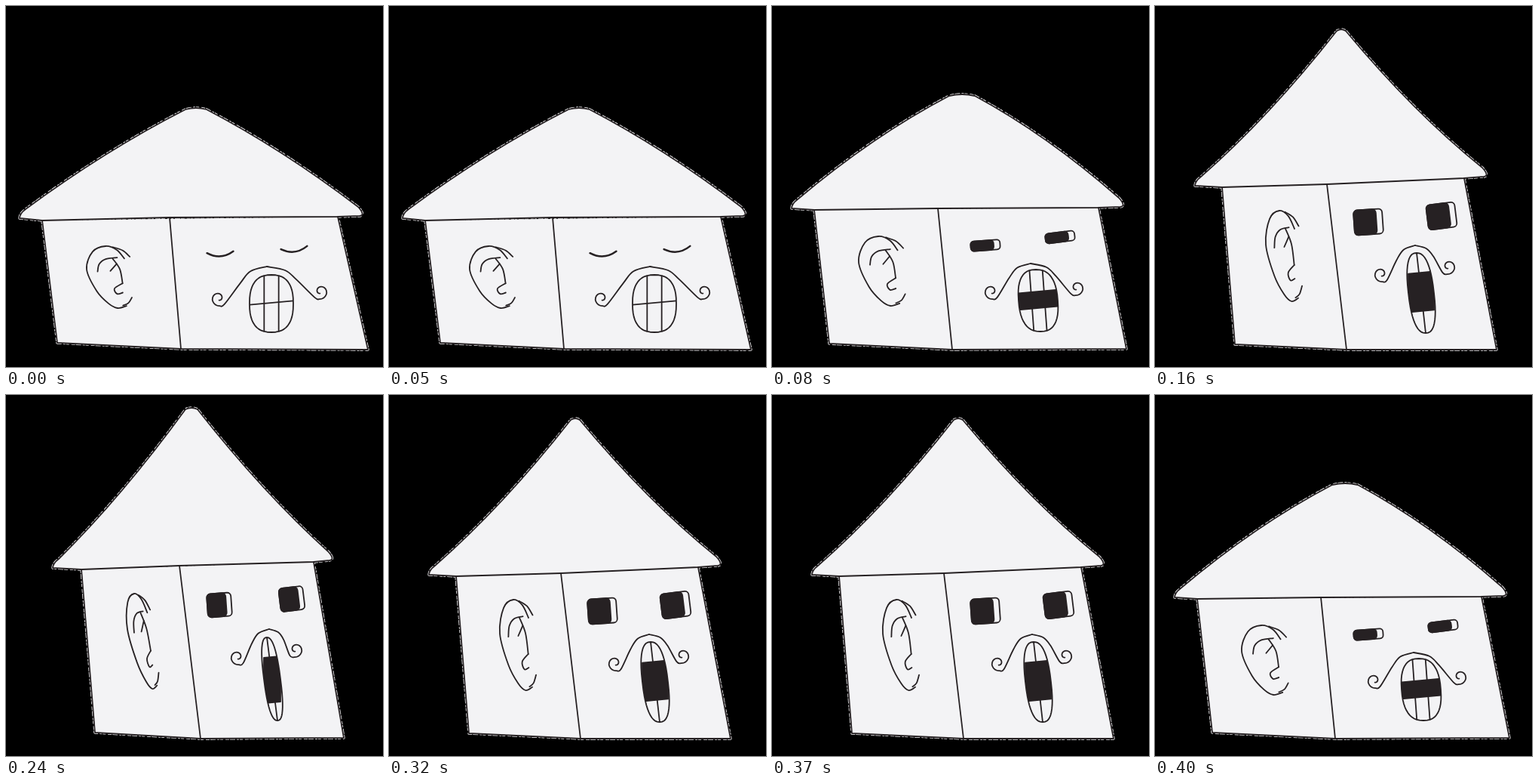
Animation, 500 px wide and 478 px high, one loop 0.48 s. Source, as an HTML page:

```html
<!DOCTYPE html>
<html lang="en">
<head>
<meta charset="utf-8">
<title>Singing house</title>
<style>
html, body { margin: 0; width: 100%; height: 100%; overflow: hidden; background: #000; }
svg { display: block; width: 500px; height: 478px; }
path, rect { fill: none; stroke: #262123; stroke-width: 1.8; stroke-linecap: round; stroke-linejoin: round; }
.paper { fill: #f3f3f5; stroke: none; }
.rim { stroke: #e8e8ea; stroke-width: 3.4; stroke-linecap: butt; stroke-dasharray: 5 1 7 2 3 1 4 3; }
.ink { fill: #262123; }
.bold { stroke-width: 2.5; }
</style>
</head>
<body>
<svg id="stage" viewBox="0 0 500 478"></svg>
<script>
// roof: left tip, apex, right tip; eave: wall tops; base: wall feet.
// ear and mouth: centre, half width, half height, lean.
const poses = [
  {
    roof: [[18, 281], [252, 133], [475, 277]], round: 14, bulge: 6,
    eave: [[48, 284], [217, 280], [440, 279]], base: [[68, 446], [232, 454], [480, 455]],
    ear: [140, 359, 31, 41, 8],
    eyes: [[284, 326], [382, 320]], eye: [35, 0],
    lip: [346, 345], curls: [[282, 387], [417, 378]],
    mouth: [352, 394, 29, 38, 0], gap: [393, 393], teeth: 3
  },
  {
    roof: [[26, 268], [252, 115], [468, 265]], round: 17, bulge: 8,
    eave: [[56, 270], [220, 268], [433, 267]], base: [[76, 447], [239, 455], [470, 454]],
    ear: [149, 351, 32, 46, 8],
    eyes: [[283, 317], [382, 306]], eye: [39, 13],
    lip: [343, 341], curls: [[291, 378], [404, 373]],
    mouth: [353, 390, 26, 41, 3], gap: [378, 400], teeth: 3
  },
  {
    roof: [[53, 238], [247, 29], [442, 225]], round: 6, bulge: -9,
    eave: [[89, 240], [228, 236], [410, 228]], base: [[106, 448], [254, 455], [453, 455]],
    ear: [173, 331, 24, 60, 8],
    eyes: [[283, 286], [380, 278]], eye: [38, 33],
    lip: [345, 317], curls: [[300, 355], [389, 345]],
    mouth: [353, 380, 17, 53, 6], gap: [353, 404], teeth: 2
  },
  {
    roof: [[62, 229], [246, 15], [435, 218]], round: 8, bulge: -8,
    eave: [[100, 231], [230, 226], [408, 221]], base: [[118, 447], [258, 455], [448, 454]],
    ear: [182, 326, 18, 63, 12],
    eyes: [[283, 278], [379, 270]], eye: [32, 31],
    lip: [349, 310], curls: [[307, 347], [384, 337]],
    mouth: [353, 376, 11, 55, 7], gap: [347, 407], teeth: 2
  }
];
const order = [0, 1, 2, 3, 2, 1];
const hold = 80;

// Ear strokes in a unit box: rim, two ticks, folds, lobe.
const earStrokes = [
  [[.7, -.6], [.45, -.88], [0, -1], [-.6, -.82], [-1, -.25], [-.75, .45], [-.35, .85], [0, 1], [.4, .93]],
  [[.3, -.97], [.7, -.86], [.95, -.66]],
  [[.25, .92], [.5, .84], [.7, .66]],
  [[-.55, -.18], [-.42, -.42], [-.1, -.58], [.4, -.63]],
  [[.33, -.43], [0, -.2]],
  [[.2, -.6], [.42, -.26], [.42, .2]],
  [[.42, .2], [.03, .37], [.1, .54], [.35, .5]]
];

const NS = "http://www.w3.org/2000/svg";
const stage = document.getElementById("stage");
const range = (n, f) => Array.from({ length: n }, (_, i) => f(i));
const line = pts => "M" + pts.join(" L");
const place = ([x, y, w, h, lean]) => ([u, v]) => [x + w * u + lean * v, y + h * v];

function make(parent, tag, attrs) {
  const el = document.createElementNS(NS, tag);
  for (const key in attrs) el.setAttribute(key, attrs[key]);
  parent.append(el);
  return el;
}

// Smooth curve through the points.
function curve(p) {
  const at = i => p[Math.max(0, Math.min(p.length - 1, i))];
  let d = "M" + p[0];
  for (let i = 0; i < p.length - 1; i++) {
    const [a, b, c, e] = [at(i - 1), at(i), at(i + 1), at(i + 2)];
    const c1 = b.map((v, k) => v + (c[k] - a[k]) / 6);
    const c2 = c.map((v, k) => v - (e[k] - b[k]) / 6);
    d += ` C${c1} ${c2} ${c}`;
  }
  return d;
}

function roofPath({ roof: [left, top, right], round, bulge, eave }) {
  const a = [left[0] + 8, left[1] - 12], d = [right[0] - 8, right[1] - 11];
  const b = [top[0] - round, top[1] + 4], c = [top[0] + round, top[1] + 4];
  const bend = (p, q) => [(p[0] + q[0]) / 2, (p[1] + q[1]) / 2 - 2 * bulge];
  return `M${left} Q${left[0]},${left[1] - 6} ${a} Q${bend(a, b)} ${b} Q${top} ${c}` +
    ` Q${bend(c, d)} ${d} Q${right[0] + 2},${right[1]} ${right[0] - 6},${right[1] + 1}` +
    ` L${[...eave].reverse().join(" L")}Z`;
}

// Half a moustache: slides off the lip and winds into a spiral.
function whisker([x, y], [cx, cy]) {
  const side = Math.sign(cx - x);
  const slide = [[0, 0], [.34, .15], [.55, .52]].map(([u, v]) => [x + (cx - x) * u, y + (cy - y) * v]);
  const spiral = range(12, i => {
    const turn = .8 + i * .62, r = 11 - i * .75;
    return [cx - side * r * Math.cos(turn), cy + r * Math.sin(turn)];
  });
  return curve([...slide, ...spiral]);
}

function drawEye(g, [x, y], [w, h], tilt) {
  const turn = { transform: `translate(${x} ${y}) rotate(${tilt})` };
  if (!h) {
    make(g, "path", { ...turn, d: `M${-w / 2},0 Q0,11 ${w / 2},0`, class: "bold" });
    return;
  }
  const box = { ...turn, x: -w / 2, y: -h / 2, height: h, rx: Math.min(5, h / 3) };
  make(g, "rect", { ...box, width: w });
  make(g, "rect", { ...box, width: w * .78, class: "ink" });
}

function drawMouth(g, pose, id) {
  const at = place(pose.mouth), [x, , w] = pose.mouth;
  const soft = v => Math.sign(v) * Math.abs(v) ** .8;
  const lips = line(range(48, i => {
    const t = i * Math.PI / 24;
    return at([soft(Math.cos(t)), soft(Math.sin(t))]);
  })) + "Z";
  make(make(g, "clipPath", { id }), "path", { d: lips });
  const inside = make(g, "g", { "clip-path": `url(#${id})` });
  for (let i = 1; i < pose.teeth; i++) {
    const u = 2 * i / pose.teeth - 1;
    make(inside, "path", { d: line([at([u, -1]), at([u, 1])]) });
  }
  const [top, bottom] = pose.gap, rise = w * .09;
  make(inside, "path", {
    d: line([[x - w, top + rise], [x + w, top - rise], [x + w, bottom - rise], [x - w, bottom + rise]]) + "Z",
    class: "ink"
  });
  make(g, "path", { d: lips });
}

function draw(pose, i) {
  const g = make(stage, "g", {});
  const add = (d, cls = "") => make(g, "path", { d, class: cls });
  const { eave, base } = pose;
  const walls = line([eave[0], ...base, eave[2]]), roof = roofPath(pose);

  for (const part of [walls, roof]) add(part, "rim");
  for (const part of [walls, roof]) add(part, "paper");
  for (const part of [walls, roof]) add(part);
  add(line([eave[1], base[1]]));
  earStrokes.forEach(s => add(curve(s.map(place(pose.ear)))));
  pose.eyes.forEach((p, k) => drawEye(g, p, pose.eye, k ? -7 : -4));
  pose.curls.forEach(c => add(whisker(pose.lip, c)));
  drawMouth(g, pose, "mouth" + i);
  return g;
}

poses.forEach((pose, i) => {
  const frames = order.map((k, step) => ({
    opacity: k === i ? 1 : 0, offset: step / order.length, easing: "steps(1, end)"
  }));
  frames.push({ opacity: frames.at(-1).opacity, offset: 1 });
  draw(pose, i).animate(frames, { duration: hold * order.length, iterations: Infinity });
});
</script>
</body>
</html>
```
